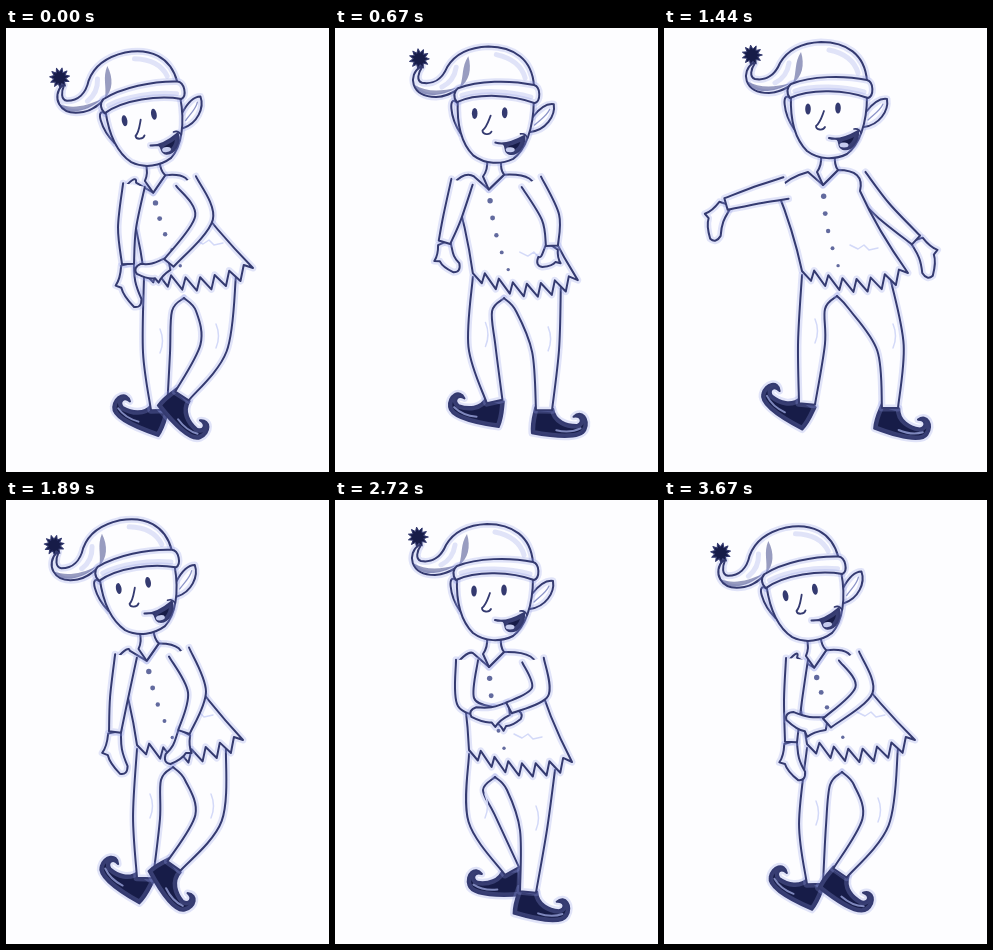
An HTML page with a canvas that plays this animation: 323 by 444 pixels, repeating every 3.73 s.

```html
<!DOCTYPE html>
<html>
<head>
<meta charset="utf-8">
<title>Dancing elf</title>
<style>
  html, body { margin: 0; width: 323px; height: 444px; overflow: hidden; background: #fdfdff; }
  canvas { display: block; }
</style>
</head>
<body>
<canvas id="stage" width="323" height="444"></canvas>
<script>
const ctx = document.getElementById('stage').getContext('2d');
const LOOP = 3730, STEP = 1000 / 18, LAST = 66, HALF = 33, PERIOD = 34;
const PAPER = '#fdfdff', INK = '#343a70', DARK = '#171c48', HAZE = 'rgba(145,155,228,.27)';

// Each row: phase, then the pose values.
const headTrack = [ // x, y, tilt in degrees
  [0, 135, 110, -10.5], [1, 129, 106, -10], [4, 139, 90, -5], [7, 150, 97, 0],
  [16, 152, 111, 0], [18, 148, 109, -2], [22, 152, 89, 0], [26, 157, 101, 0], [33, 138, 113, -10.5]
];
const torsoTrack = [ // left shoulder, right shoulder, left hem, right hem
  [0, 128, 157, 180, 153, 138, 245, 247, 240],
  [1, 120, 156, 173, 152, 131, 245, 237, 240],
  [4, 119, 140, 186, 139, 140, 236, 246, 236],
  [7, 121, 145, 193, 145, 143, 239, 250, 238],
  [16, 132, 160, 198, 160, 134, 250, 237, 262],
  [18, 134, 159, 198, 160, 138, 252, 240, 256],
  [22, 122, 142, 194, 140, 138, 240, 243, 242],
  [26, 122, 160, 193, 151, 138, 243, 244, 245],
  [33, 133, 159, 185, 156, 143, 244, 251, 240]
];
const leftArmTrack = [ // elbow, wrist, fingertips
  [0, 121, 200, 122, 236, 132, 278], [1, 113, 198, 109, 232, 118, 273],
  [4, 92, 126, 58, 106, 26, 122], [7, 98, 130, 64, 117, 36, 143],
  [10, 102, 166, 72, 185, 62, 220], [13, 124, 198, 128, 222, 150, 245],
  [16, 131, 202, 158, 213, 186, 215], [18, 131, 200, 140, 236, 158, 270],
  [22, 96, 130, 62, 113, 30, 134], [26, 97, 166, 62, 176, 50, 212],
  [29, 117, 196, 118, 230, 124, 268], [33, 129, 200, 127, 242, 138, 279]
];
const rightArmTrack = [
  [0, 198, 190, 163, 235, 130, 242], [1, 191, 192, 178, 232, 161, 262],
  [4, 224, 114, 274, 95, 314, 114], [7, 225, 118, 268, 102, 303, 128],
  [10, 220, 180, 241, 209, 256, 240], [13, 213, 190, 205, 215, 180, 228],
  [16, 205, 192, 174, 208, 136, 213], [18, 204, 184, 200, 210, 188, 226],
  [22, 226, 120, 274, 102, 314, 122], [26, 219, 182, 252, 212, 265, 249],
  [29, 214, 190, 214, 224, 222, 252], [33, 200, 190, 163, 223, 123, 216]
];
const leftLegTrack = [ // knee, ankle, shoe angle
  [0, 151, 325, 153, 382, 24], [1, 141, 318, 139, 378, 35], [7, 145, 318, 143, 372, 22],
  [16, 147, 318, 177, 371, 2], [18, 137, 314, 194, 350, -25],
  [26, 148, 315, 143, 376, 33], [33, 149, 325, 151, 384, 29]
];
const rightLegTrack = [
  [0, 207, 320, 176, 368, 46], [1, 202, 318, 168, 366, 56], [4, 213, 320, 196, 386, 32],
  [7, 223, 315, 225, 372, 0], [16, 198, 330, 193, 392, 11], [18, 197, 330, 199, 390, -3],
  [26, 226, 320, 226, 380, 15], [30, 214, 332, 201, 398, 28], [33, 211, 322, 176, 373, 33]
];
const crotchTrack = [
  [0, 178, 270], [1, 167, 267], [7, 178, 262], [16, 160, 277], [18, 160, 273],
  [26, 173, 268], [33, 178, 272]
];

// Smooth periodic interpolation through the rows of a track.
function pose(track, phase) {
  const count = track.length;
  const row = i => track[(i + count) % count];
  const time = i => row(i)[0] + PERIOD * Math.floor(i / count);
  let i = count - 1;
  while (track[i][0] > phase) i--;
  const span = time(i + 1) - time(i), u = (phase - time(i)) / span;
  return row(i).slice(1).map((a, k) => {
    const at = j => row(j)[k + 1], b = at(i + 1);
    const slope = j => (at(j + 1) - at(j - 1)) / (time(j + 1) - time(j - 1)) * span;
    const m = slope(i), n = slope(i + 1);
    return a + u * m + u * u * (3 * (b - a) - 2 * m - n) + u * u * u * (2 * (a - b) + m + n);
  });
}

const pairs = v => v.reduce((out, x, i) => (i % 2 ? out[out.length - 1].push(x) : out.push([x]), out), []);
const shift = (p, n, d) => [p[0] + n[0] * d, p[1] + n[1] * d];
function normal(a, b) {
  const dx = b[0] - a[0], dy = b[1] - a[1], len = Math.hypot(dx, dy) || 1;
  return [-dy / len, dx / len];
}

function curveThrough(path, pts) {
  for (let i = 0; i < pts.length - 1; i++) {
    const a = pts[Math.max(i - 1, 0)], b = pts[i], c = pts[i + 1], d = pts[Math.min(i + 2, pts.length - 1)];
    path.bezierCurveTo(b[0] + (c[0] - a[0]) / 6, b[1] + (c[1] - a[1]) / 6,
      c[0] - (d[0] - b[0]) / 6, c[1] - (d[1] - b[1]) / 6, c[0], c[1]);
  }
}

function line(path, width = 2, color = INK) {
  ctx.lineWidth = width;
  ctx.strokeStyle = color;
  ctx.stroke(path);
}

function paint(path, fill = PAPER) {
  ctx.fillStyle = fill;
  ctx.fill(path);
  line(path, 7, HAZE);
  line(path);
}

function blob(x, y, rx, ry, fill) {
  ctx.beginPath();
  ctx.ellipse(x, y, rx, ry, 0, 0, 7);
  ctx.fillStyle = fill;
  ctx.fill();
}

function local([x, y], angle, flipX, flipY, draw) {
  ctx.save();
  ctx.translate(x, y);
  ctx.rotate(angle);
  ctx.scale(flipX, flipY);
  draw();
  ctx.restore();
}

// Two sides of a limb, joined at the far end and open at the near end.
function limb(near, far) {
  const path = new Path2D();
  path.moveTo(...near[0]);
  curveThrough(path, near);
  path.lineTo(...far[0]);
  curveThrough(path, far);
  paint(path);
}

const shoe = new Path2D('M-9 -2L9 -2C12 10 24 13 34 12C40 9 38 2 30 4C37 -5 47 5 43 16C40 25 20 27 -10 24C-12 14 -10 6 -9 -2Z');
const shoeShine = new Path2D('M14 19Q28 21 38 15');

function drawLeg([kx, ky, ax, ay, angle], hip, crotch, side) {
  const knee = [kx, ky], ankle = [ax, ay];
  const top = [(hip[0] + crotch[0]) / 2, (hip[1] + crotch[1]) / 2];
  const kn = normal(top, ankle), an = normal(knee, ankle);
  local(ankle, angle * Math.PI / 180, -side, 1, () => {
    paint(shoe, DARK);
    line(shoeShine, 2, '#7f88bd');
  });
  limb([hip, shift(knee, kn, 14 * side), shift(ankle, an, 8 * side)],
    [shift(ankle, an, -8 * side), shift(knee, kn, -13 * side), [crotch[0] - 12 * side, crotch[1] + 13], crotch]);
  line(new Path2D(`M${kx + 3} ${ky - 24}q5 12 0 24`), 1.5, '#d3d9f8');
}

function drawArm(values, shoulder, side) {
  const [elbow, wrist, tip] = pairs(values);
  const joints = [shoulder, elbow, wrist], widths = [11, 9, 6];
  const normals = [normal(shoulder, elbow), normal(shoulder, wrist), normal(elbow, wrist)];
  const edge = s => joints.map((p, i) => shift(p, normals[i], widths[i] * s));
  const dx = tip[0] - wrist[0], dy = tip[1] - wrist[1], len = Math.hypot(dx, dy);
  local(wrist, Math.atan2(dy, dx), 1, side, () => paint(new Path2D(
    `M0 -6C12 -4 16 -1 ${len - 6} -5Q${len + 3} -3 ${len} 4Q${len * .7} 12 ${len * .5} 12` +
    `L${len * .42} 17Q${len * .3} 11 0 7Z`)));
  limb(edge(1), edge(-1).reverse());
}

function drawTorso([shL, shR, hemL, hemR], place) {
  const path = new Path2D(), v = place(2, 56), teeth = 15;
  path.moveTo(...v);
  path.lineTo(...place(-13, 43));
  path.quadraticCurveTo(shL[0] + 3, shL[1] - 11, shL[0] - 9, shL[1] + 2);
  path.quadraticCurveTo((shL[0] + hemL[0]) / 2 - 1, (shL[1] + hemL[1]) / 2, ...hemL);
  for (let i = 1; i < teeth; i++) {
    const u = i / teeth;
    path.lineTo(hemL[0] + (hemR[0] - hemL[0]) * u + (i % 2 ? 2 : -2),
      hemL[1] + (hemR[1] - hemL[1]) * u + 13 * Math.sin(Math.PI * u) + (i % 2 ? 7 : -6));
  }
  path.lineTo(...hemR);
  path.quadraticCurveTo((shR[0] + hemR[0]) / 2 - 5, (shR[1] + hemR[1]) / 2 + 4, shR[0] + 3, shR[1] + 12);
  path.quadraticCurveTo(shR[0] + 8, shR[1] - 9, ...place(17, 41));
  path.closePath();
  paint(path);
  const end = [hemL[0] * .64 + hemR[0] * .36, hemL[1] * .64 + hemR[1] * .36];
  for (let i = 0; i < 5; i++) {
    const u = .13 + i * .2, r = 2.7 - i * .25;
    blob(v[0] + (end[0] - v[0]) * u - 4 * Math.sin(Math.PI * u), v[1] + (end[1] - v[1]) * u, r, r, '#626a9e');
  }
  line(new Path2D(`M${hemR[0] - 58} ${hemR[1] - 28}l8 4 6 -4 5 5 9 -2`), 1.5, '#d3d9f8');
}

const art = {
  ears: new Path2D('M-30 -30C-40 -40 -38 -16 -27 0M45 -17C52 -26 60 -31 66 -30C68 -18 58 -4 43 -2'),
  innerEar: new Path2D('M47 -9C53 -15 59 -18 62 -25'),
  face: new Path2D('M-30 -33C-31 -8 -26 10 -14 22C-2 31 14 31 26 25C38 16 46 -5 46 -33'),
  nose: new Path2D('M3 -18C0 -10 -1 -6 -5 -3C-5 1 2 2 4 -2'),
  mouth: new Path2D('M8 9C18 12 30 6 37 2C38 12 30 22 22 20C16 18 20 13 16 10Z'),
  cheek: new Path2D('M33 0Q38 -1 40 4'),
  hat: new Path2D('M-68 -66C-80 -58 -78 -36 -52 -36C-42 -36 -35 -41 -28 -45L46 -48C44 -75 25 -87 0 -87C-22 -86 -34 -78 -41 -66C-46 -54 -55 -48 -66 -50C-72 -52 -70 -60 -66 -66Z'),
  hatShade: new Path2D('M-28 -46C-24 -58 -27 -66 -20 -77C-16 -64 -19 -52 -28 -46ZM-74 -48C-70 -36 -50 -34 -30 -46C-48 -41 -62 -41 -74 -48Z'),
  hatGlow: new Path2D('M8 -79Q32 -74 37 -56M-46 -46Q-34 -52 -32 -66'),
  band: new Path2D('M-30 -45C-10 -53 22 -54 46 -49C53 -47 53 -33 47 -31C25 -39 -10 -41 -31 -31C-35 -36 -34 -42 -30 -45Z'),
  bandShade: new Path2D('M-26 -38C-8 -44 22 -43 43 -37')
};
const pompom = new Path2D();
for (let i = 0; i < 22; i++) {
  const a = i * Math.PI / 11, r = i % 2 ? 6 : 10;
  pompom.lineTo(-69 + r * Math.cos(a), -74 + r * Math.sin(a));
}
pompom.closePath();

function drawHead() {
  paint(art.ears);
  line(art.innerEar, 1.3, '#8d95c8');
  paint(art.face);
  blob(-13, -20, 2.8, 5.5, INK);
  blob(17, -21, 2.8, 5.5, INK);
  line(art.nose, 1.8);
  paint(art.mouth, DARK);
  blob(23, 16, 4.5, 2.5, '#c5cbed');
  line(art.cheek, 1.6);
  paint(art.hat);
  ctx.fillStyle = 'rgba(70,78,140,.55)';
  ctx.fill(art.hatShade);
  line(art.hatGlow, 5, HAZE);
  paint(art.band);
  line(art.bandShade, 5, HAZE);
  ctx.fillStyle = DARK;
  ctx.fill(pompom);
  line(pompom, 1, INK);
}

function drawElf(phase) {
  const [hx, hy, tilt] = pose(headTrack, phase);
  const angle = tilt * Math.PI / 180, cos = Math.cos(angle), sin = Math.sin(angle);
  const place = (x, y) => [hx + x * cos - y * sin, hy + x * sin + y * cos];
  const torso = pairs(pose(torsoTrack, phase));
  const [shL, shR, hemL, hemR] = torso;
  const crotch = pose(crotchTrack, phase);
  const rightArm = () => drawArm(pose(rightArmTrack, phase), shR, -1);
  const armBehind = phase > 16.5 && phase < 28;

  ctx.fillStyle = PAPER;
  ctx.fillRect(0, 0, 323, 444);
  drawLeg(pose(leftLegTrack, phase), shift(hemL, [0, 1], 4), crotch, 1);
  drawLeg(pose(rightLegTrack, phase), [hemR[0] - 17, hemR[1] + 8], crotch, -1);
  if (armBehind) rightArm();
  drawTorso(torso, place);
  drawArm(pose(leftArmTrack, phase), shL, 1);
  if (!armBehind) rightArm();
  local([hx, hy], angle, 1, 1, () => {
    paint(new Path2D('M0 26Q1 36 -4 43L2 56L17 41Q13 36 14 26'));
    drawHead();
  });
}

ctx.lineCap = ctx.lineJoin = 'round';
function tick() {
  const step = Math.min(LAST, Math.floor((performance.now() % LOOP + 5) / STEP));
  drawElf(step < HALF ? step : step - HALF);
  requestAnimationFrame(tick);
}
tick();
</script>
</body>
</html>
```
